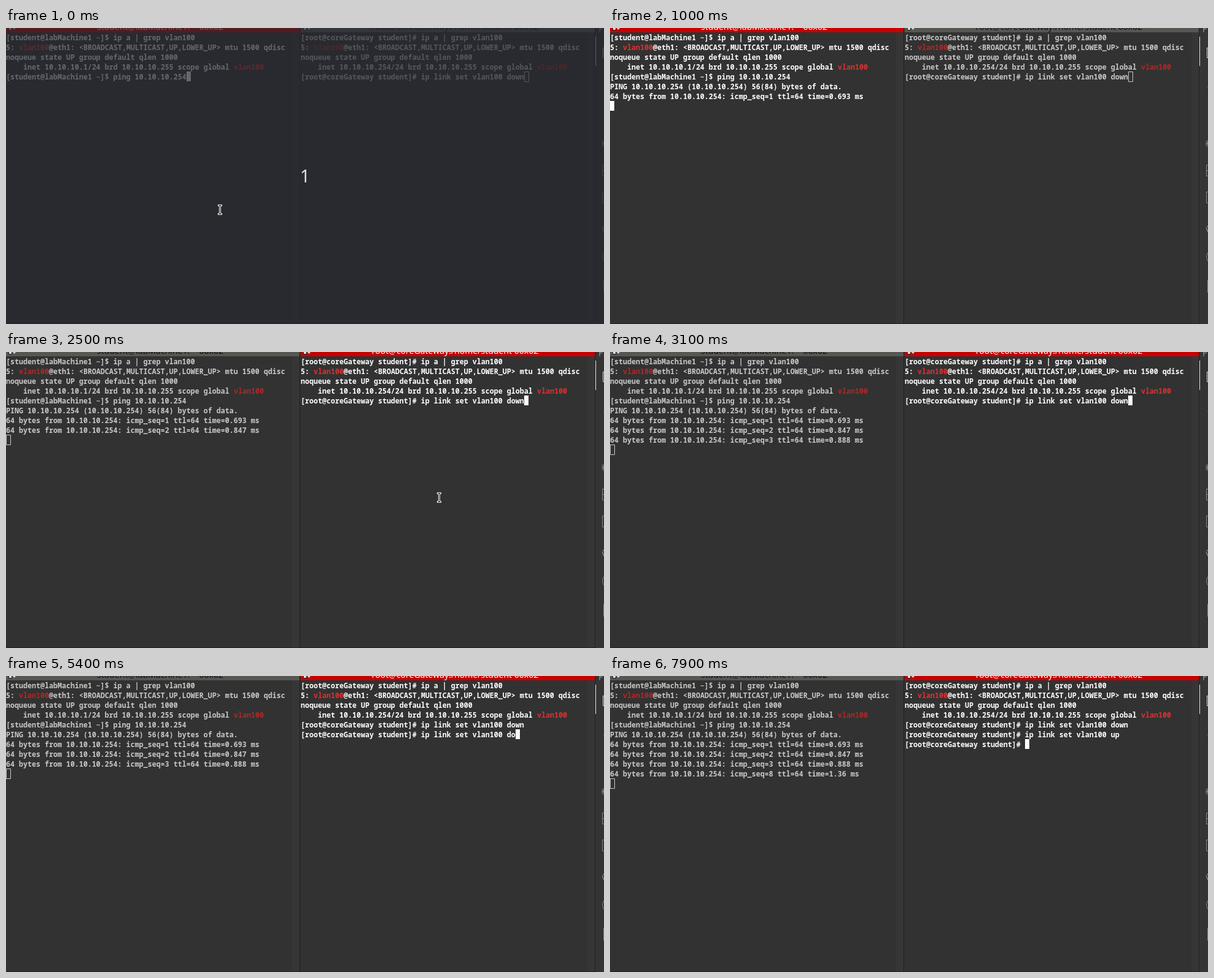
Animation, 974 px wide and 483 px high, one loop 8000 ms. Source, as an HTML page with a canvas:

```html
<!DOCTYPE html>
<html lang="en">
<head>
<meta charset="utf-8">
<title>VLAN ping demo</title>
<style>
html, body { margin: 0; width: 100%; height: 100%; overflow: hidden; background: #323232; }
canvas { display: block; }
</style>
</head>
<body>
<canvas id="stage" width="974" height="483"></canvas>
<script>
const ctx = document.getElementById('stage').getContext('2d');
const LOOP = 8000, STEP = 100;
const COL = 7, ROW = 16, TOP = 7;
const MONO = 'bold 11.667px "Noto Sans Mono", monospace';
const SANS = '14px "Noto Sans", sans-serif';
const ACTIVE = { text: '#fff', match: '#dc322f', bar: '#c80000', title: '#fff' };
const IDLE = { text: '#c8c8c8', match: '#b02826', bar: '#555753', title: '#111' };

const LEFT_PROMPT = '[student@labMachine1 ~]$ ';
const RIGHT_PROMPT = '[root@coreGateway student]# ';
const DOWN = 'ip link set vlan100 down', UP = 'ip link set vlan100 up';

// Braces mark text highlighted by grep.
const listing = (prompt, address) => [
  prompt + 'ip a | grep vlan100',
  '5: {vlan100}@eth1: <BROADCAST,MULTICAST,UP,LOWER_UP> mtu 1500 qdisc',
  'noqueue state UP group default qlen 1000',
  `    inet ${address}/24 brd 10.10.10.255 scope global {vlan100}`
];

const replies = [[900, 1, '0.693'], [1900, 2, '0.847'], [2900, 3, '0.888'], [7900, 8, '1.36']];
const within = (t, spans) => spans.some(([from, to]) => t >= from && t < to);
const latest = (t, keys) => keys.filter(([start]) => t >= start).pop()[1];

function rect(x, y, w, h, color) {
  ctx.fillStyle = color;
  ctx.fillRect(x, y, w, h);
}

function label(text, x, y, font, color, align = 'left') {
  ctx.font = font;
  ctx.fillStyle = color;
  ctx.textAlign = align;
  ctx.fillText(text, x, y);
}

function outline(d, color, width = 1) {
  ctx.strokeStyle = color;
  ctx.lineWidth = width;
  ctx.stroke(new Path2D(d));
}

function leftRows(t) {
  const rows = [...listing(LEFT_PROMPT, '10.10.10.1'), LEFT_PROMPT + 'ping 10.10.10.254'];
  if (t < 900) return rows;
  rows.push('PING 10.10.10.254 (10.10.10.254) 56(84) bytes of data.');
  for (const [start, seq, time] of replies)
    if (t >= start) rows.push(`64 bytes from 10.10.10.254: icmp_seq=${seq} ttl=64 time=${time} ms`);
  return [...rows, ''];
}

function rightRows(t) {
  const rows = [...listing(RIGHT_PROMPT, '10.10.10.254'), RIGHT_PROMPT + DOWN];
  if (t < 3500) return rows;
  rows.push(RIGHT_PROMPT + latest(t, [
    [3500, ''], [4700, DOWN], [5300, DOWN.slice(0, -1)], [5400, DOWN.slice(0, -2)],
    [5600, DOWN.slice(0, -3)], [5700, DOWN.slice(0, -4)], [6800, UP]
  ]));
  if (t >= 7900) rows.push(RIGHT_PROMPT);
  return rows;
}

function drawPane(x, width, title, rows, focused, cursorOn) {
  const look = focused ? ACTIVE : IDLE;
  rect(x, 0, width, TOP, look.bar);
  label(title, x + width / 2 + 12, 3, SANS, look.title, 'center');
  rect(x + 4, 0, 6, 4, '#222');
  rect(x + 5, 0, 4, 3, '#ddd');
  ctx.fillStyle = '#ddd';
  ctx.fill(new Path2D(`M${x + 11} 0h5l-2.5 3z`));
  rect(x + width - 12, TOP, 12, 475, '#373637');

  rows.forEach((row, i) => {
    let column = 0;
    row.split(/[{}]/).forEach((part, k) => {
      label(part, x + column * COL, TOP + i * ROW + 13, MONO, k % 2 ? look.match : look.text);
      column += part.length;
    });
  });

  if (!cursorOn) return;
  const cx = x + rows.at(-1).length * COL, cy = TOP + (rows.length - 1) * ROW;
  if (focused) rect(cx, cy, COL, ROW, '#fff');
  else outline(`M${cx + .5} ${cy + .5}h7v16h-7z`, look.text);
}

function drawSidebar() {
  rect(959, 0, 1, 483, '#222');
  rect(960, 0, 14, 483, '#343434');
  rect(960, 14, 1, 48, '#eee');
  label('F', 965, 7, SANS, '#999');
  outline('M975 32.5h-2.5v16h2.5', '#ddd');
  outline('M975 95l-2 2', '#777');
  outline('M970 185l4 3-4 4M970 188.5h4M973 183v11', '#888');
  outline('M975 223.5h-3.5v18h3.5M972 232.5h3M975 267.5h-3.5v18h3.5', '#888');
  outline('M971 326l3 7M972 325l2-2', '#888', 1.5);
  outline('M975 365q-7 8.500 0 17', '#888');
  outline('M975 411.500h-1.5v20h1.5', '#888');
}

function drawPointer(x, y) {
  const beam = `M${x - 2} ${y - 7}h4M${x} ${y - 7}v14M${x - 2} ${y + 7}h4`;
  ctx.lineCap = 'square';
  outline(beam, '#fff', 3);
  outline(beam, '#111');
  ctx.lineCap = 'butt';
}

function pointerAt(t) {
  if (t < 1000) return [348.5, 296.5];
  if (!within(t, [[2000, 3100]])) return null;
  const rest = (1 - Math.min(1, (t - 2000) / 200)) ** 2;
  return [705.5 - 150 * rest, 237.5 + 14 * rest];
}

function draw(t) {
  const leftFocused = t < 2500;
  rect(0, 0, 974, 483, '#323232');
  drawPane(0, 478, 'student@labMachine1: ~ 66x62', leftRows(t), leftFocused, !within(t, [[500, 900]]));
  drawPane(480, 479, 'root@coreGateway:/home/student 66x62', rightRows(t), !leftFocused,
    !within(t, [[2800, 3100], [3700, 4300], [6300, 6600], [7400, 7700]]));
  rect(478, 0, 1, 483, '#202020');
  drawSidebar();
  rect(0, 482, 960, 1, '#222');

  if (t < 100) {
    rect(0, 0, 974, 483, 'rgba(36, 39, 46, .7)');
    label('1', 487, 252, '29px "Noto Sans", sans-serif', '#ddd', 'center');
  }
  const pointer = pointerAt(t);
  if (pointer) drawPointer(...pointer);
}

const started = performance.now();
function frame() {
  const elapsed = (performance.now() - started) % LOOP;
  draw(Math.floor(elapsed / STEP) * STEP);
  requestAnimationFrame(frame);
}
frame();
</script>
</body>
</html>
```
